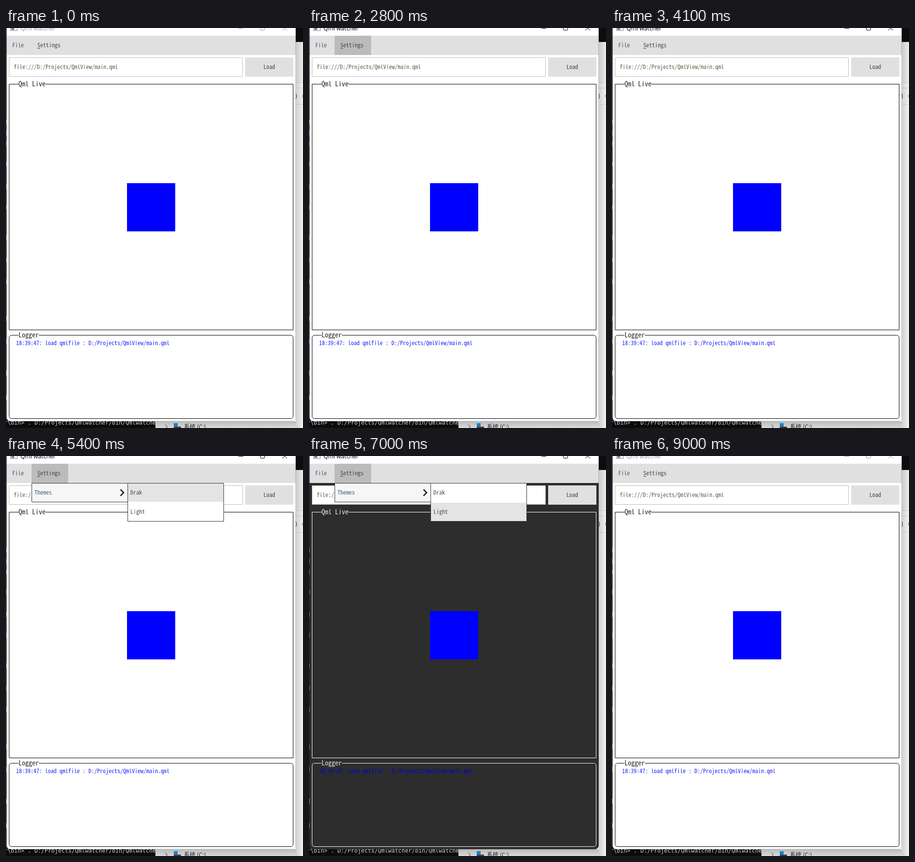
An HTML page with a canvas for the animation above (9100 ms loop, 616 by 830 pixels).

```html
<!DOCTYPE html>
<html lang="en">
<head>
<meta charset="utf-8">
<title>Live view</title>
<style>
  html, body { margin: 0; width: 100%; height: 100%; overflow: hidden; background: #fff; }
  canvas { display: block; }
</style>
</head>
<body>
<canvas id="stage" width="616" height="830"></canvas>
<script>
const ctx = document.getElementById('stage').getContext('2d');
const LOOP = 9100;
const MONO = '"Noto Sans Mono CJK SC", "Noto Sans CJK SC", monospace';
const SANS = '"Open Sans", sans-serif';
const TERM = '"DejaVu Sans Mono", monospace';

// Menu levels: each one includes what the lower ones open.
const BAR = 1, MENU = 2, THEMES = 3, SUB = 4, DRAK = 5, LIGHT = 6;
const steps = [
  [0, 0], [2800, BAR], [3100, MENU], [3200, THEMES], [3400, SUB], [3600, DRAK], [4000, 0],
  [4500, BAR], [4600, MENU], [4700, THEMES], [4900, SUB], [5400, DRAK], [5500, 0],
  [5900, BAR], [6100, MENU], [6200, THEMES], [6400, SUB], [7000, LIGHT], [7100, 0]
];

function rect(x, y, w, h, color) {
  ctx.fillStyle = color;
  ctx.fillRect(x, y, w, h);
}

function frame(x, y, w, h, color, r = 0) {
  ctx.strokeStyle = color;
  ctx.lineWidth = 1;
  ctx.beginPath();
  ctx.roundRect(x + .5, y + .5, w - 1, h - 1, r);
  ctx.stroke();
}

function text(s, x, y, color, size = 12, family = MONO) {
  ctx.font = `${size}px ${family}`;
  ctx.fillStyle = color;
  ctx.fillText(s, x, y);
}

function line(points, color, width = 1) {
  ctx.strokeStyle = color;
  ctx.lineWidth = width;
  ctx.beginPath();
  points.forEach(([x, y]) => ctx.lineTo(x, y));
  ctx.stroke();
}

function fade(x0, y0, x1, y1, from, to) {
  const g = ctx.createLinearGradient(x0, y0, x1, y1);
  g.addColorStop(0, from);
  g.addColorStop(1, to);
  return g;
}

function desktop() {
  // Terminal behind the window
  rect(0, 0, 616, 830, '#0c0c0c');
  for (const y of [190, 213, 235, 277, 324, 367, 430, 477, 521, 598, 645])
    rect(0, y, 2, 10, '#2f7f7c');
  for (const y of [711, 762]) rect(0, y, 2, 10, '#b08a50');
  text('r\\bin> . D:/Projects/Qmlwatcher/bin/Qmlwatche', -4, 823, '#ccc', 11.63, TERM);

  // File browser behind the window
  rect(310, 29, 306, 801, '#f7f7f7');
  rect(601, 29, 15, 84, '#f0f0f0');
  rect(601, 113, 15, 1, '#d8d8d8');
  rect(601, 124, 15, 1, '#d8d8d8');
  rect(601, 158, 15, 1, '#d8d8d8');
  text(')', 600, 145, '#333', 12, SANS);
  line([[614, 139], [618, 143]], '#333');
  line([[614, 144], [618, 140]], '#333');
  rect(601, 29, 15, 801, fade(601, 0, 616, 0, 'rgba(0,0,0,.16)', 'rgba(0,0,0,.02)'));
  rect(310, 816, 291, 14, fade(0, 816, 0, 830, 'rgba(0,0,0,.25)', 'rgba(0,0,0,.12)'));
  line([[330.5, 823], [334.5, 827.5], [330.5, 832]], '#666', 1.2);
  rect(348, 820, 8, 8, '#1683d0');
  rect(348, 827, 15, 3, '#3c4650');
  text('系统 (C:)', 369, 832, '#222', 12, '"Noto Sans CJK SC", sans-serif');
}

function titleBar(active) {
  const ink = active ? '#000' : '#999';
  rect(10, -6, 14, 12, '#f2f2f2');
  rect(11, -4, 6, 8, '#4f9088');
  frame(9, -8, 15, 14, '#8c8c8c');
  text('Qml watcher', 30, 5, ink, 12.2, SANS);
  rect(482, 0, 10, 1, ink);
  frame(527, -5, 10, 10, ink, 1);
  line([[573, -5], [583, 5]], ink);
  line([[583, -5], [573, 5]], ink);
}

function groupBox(label, y, h, back, ink, r) {
  frame(6, y, 590, h, ink, r);
  rect(26, y - 2, label.length * 7, 5, back);
  text(label, 26, y + 5, ink === '#fff' ? '#e8e8e8' : '#222', 14);
}

function popup(x, h) {
  rect(x, 56, 200, h, '#fff');
  frame(x, 56, 200, h, '#353637');
}

function menus(level) {
  rect(1, 16, 600, 40, '#e0e0e0');
  if (level >= BAR) rect(53, 16, 76, 40, '#bbb');
  text('File', 13, 40, '#46566a');
  text('Settings', 65, 40, '#3c4854');
  rect(65, 42, 6, 1, '#3c4854');
  if (level >= MENU) {
    popup(53, 40);
    const hot = level === THEMES || level === SUB;
    rect(54, 57, 198, 38, hot ? '#e4e4e4' : '#f6f6f6');
    text('Themes', 59, 80, '#3c5f90');
    line([[237.5, 69.5], [244, 76], [237.5, 82.5]], '#222', 2.6);
  }
  if (level >= SUB) {
    popup(252, 80);
    if (level === DRAK) rect(253, 57, 198, 38, '#e4e4e4');
    if (level === LIGHT) rect(253, 97, 198, 38, '#e4e4e4');
    text('Drak', 258, 80, '#584a3e');
    text('Light', 258, 120, '#584a3e');
  }
}

function draw(t) {
  const dark = t >= 5500 && t < 7100;
  const level = steps.findLast(([at]) => at <= t)[1];
  const back = dark ? '#2d2d2d' : '#fff';
  const ink = dark ? '#fff' : '#000';

  desktop();
  ctx.save();
  ctx.beginPath();
  ctx.roundRect(1, -20, 600, 836, 8);
  ctx.clip();
  rect(1, 0, 600, 816, back);
  rect(1, 0, 600, 16, '#fff');
  titleBar(t >= 1000 && t < 9000);

  rect(6, 61, 485, 40, '#fff');
  frame(6, 61, 485, 40, '#bdbdbd');
  text('file:///D:/Projects/QmlView/main.qml', 16, 85, '#655646');
  rect(496, 61, 100, 40, '#e0e0e0');
  text('Load', 534, 85, '#43403c');

  groupBox('Qml Live', 116, 511, back, ink, 0);
  rect(251, 322, 100, 100, '#00f');
  groupBox('Logger', 637, 174, back, ink, 5);
  text('18:39:47: load qmlfile : D:/Projects/QmlView/main.qml', 21, 658, dark ? '#0000d8' : '#2020ff');
  menus(level);
  ctx.restore();
  frame(1, -20, 600, 836, 'rgba(90,90,90,.3)', 8);
}

function tick(now) {
  draw(now % LOOP);
  requestAnimationFrame(tick);
}
draw(0);
requestAnimationFrame(tick);
</script>
</body>
</html>
```
